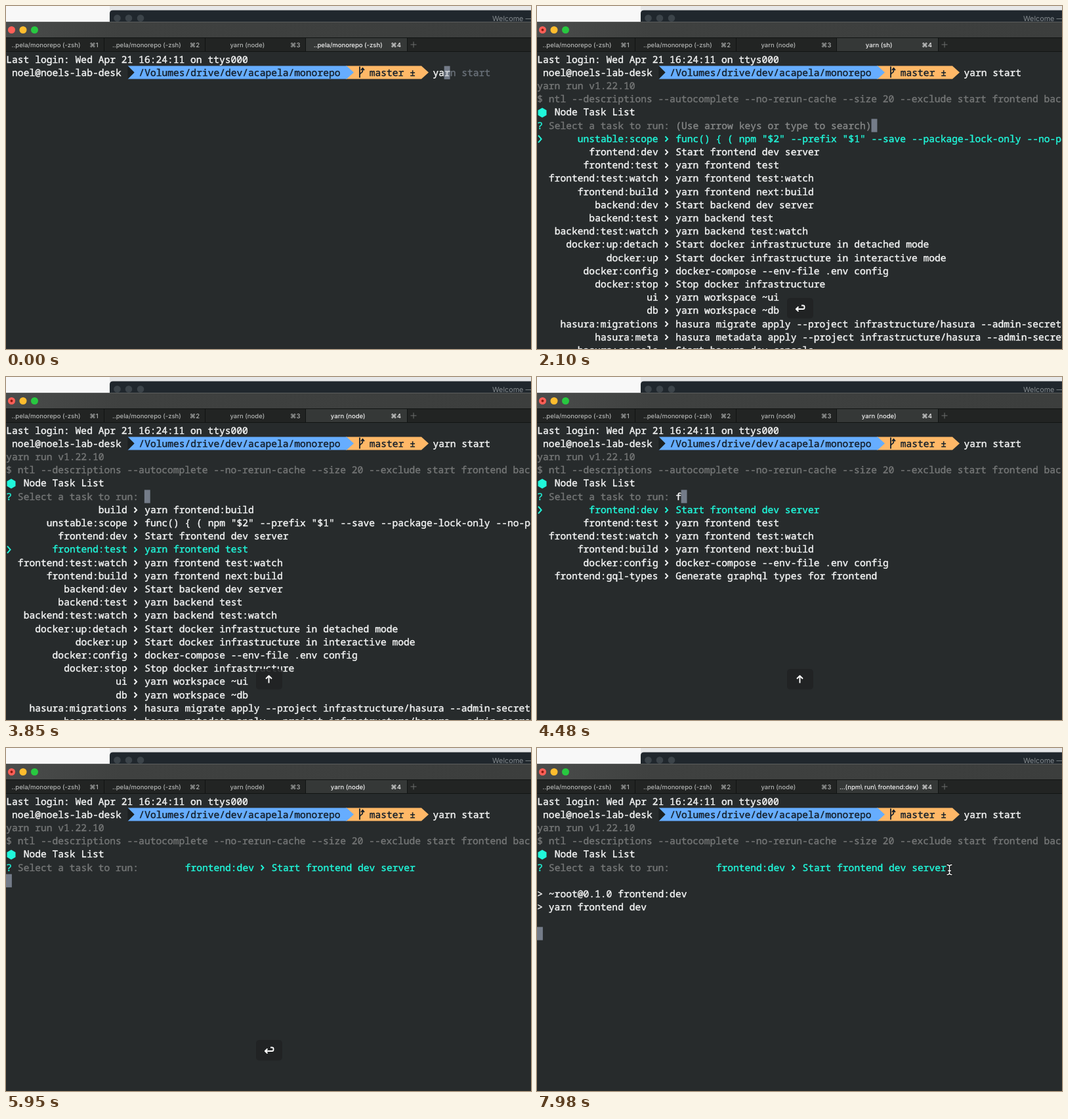
Recreate the animation shown at these times as an HTML page. Size 800x524 px, loop 8 s.

```html
<!DOCTYPE html>
<html lang="en">
<head>
<meta charset="utf-8">
<style>
html, body { margin: 0; width: 100%; height: 100%; overflow: hidden; background: #272b2c; }
svg { display: block; width: 800px; height: 524px; }
text { white-space: pre; text-rendering: geometricPrecision; }
.term text { font: 500 14.64px "Noto Sans Mono", monospace; font-variant-ligatures: none; stroke-width: .42px; }
.ui text { font: 500 9.5px Inter, sans-serif; text-anchor: middle; }
</style>
</head>
<body>
<svg viewBox="0 0 800 524">
  <defs>
    <linearGradient id="bar">
      <stop offset="0" stop-color="#4a4c4b"/><stop offset=".22" stop-color="#3f4140"/><stop offset="1" stop-color="#3c3e3d"/>
    </linearGradient>
  </defs>
  <rect width="800" height="30" fill="#f8f8f8"/>
  <rect x="158" width="642" height="10" fill="#e6e7e8"/>
  <path d="M158 30V11.500q0-5 5-5H800V30Z" fill="#20272d"/>
  <g fill="#3c444a"><circle cx="169.500" cy="18.500" r="5.300"/><circle cx="187" cy="18.500" r="5.300"/><circle cx="205" cy="18.500" r="5.300"/></g>
  <text x="741" y="22.500" font-family="Inter, sans-serif" font-size="10.800" fill="#878d91">Welcome —</text>
  <path d="M0 24H800V524H0Z" fill="#272b2c"/>
  <rect y="24" width="800" height="25" fill="url(#bar)"/>
  <path d="M0 24.500H800" stroke="#5c5e5d"/>
  <circle cx="8.500" cy="36.500" r="5.500" fill="#ff5f57"/>
  <circle cx="26" cy="36.500" r="5.500" fill="#febc2e"/>
  <circle cx="43.500" cy="36.500" r="5.500" fill="#28c840"/>
  <circle id="dirty" cx="8.500" cy="36.500" r="1.900" fill="#8c1a10"/>
  <rect y="49" width="800" height="20" fill="#222423"/>
  <rect x="457" y="49" width="154" height="20" fill="#353837"/>
  <path d="M0 48.500H800M0 69.500H800M149.500 49V69M303.500 49V69M456.500 49V69M611.500 49V69" stroke="#111413"/>
  <path d="M616.500 59H625.500M621 54.500V63.500" stroke="#6c6f6e"/>
  <g class="ui" id="tabs"></g>
  <g class="term" id="term" transform="translate(0 -.5)"></g>
  <g id="key"></g>
  <g id="mouse" fill="none" stroke-linecap="round">
    <path id="beam" d="M625 178.500Q628.500 178.500 628.500 181.500Q628.500 178.500 632 178.500M628.500 181V191M625 193.500Q628.500 193.500 628.500 190.500Q628.500 193.500 632 193.500M626.500 187.500H630.500" stroke="#101314" stroke-width="3.400"/>
  </g>
</svg>
<script>
const LOOP = 8000, CW = 8.785, LH = 20.19;
const WHITE = '#f4f5f5', GRAY = '#747676', CYAN = '#20f7da', CURSOR = '#747c89';
const T = { enter: 1400, yarn: 1610, script: 1680, list: 1890, node: 2300, pick: 5850, run: 7630, mouse: 7770 };
const keys = [
  [T.enter, 'enter'], [2560, 'down'], [2840, 'down'], [3120, 'down'],
  [3640, 'up'], [4000, 'up'], [T.pick + 70, 'enter']
];
const glyphs = {
  enter: 'M403 457.500H405.500Q407.500 457.500 407.500 459.500V461Q407.500 463 405.500 463H395M398.500 459.500L394.800 463L398.500 466.500',
  up: 'M400.500 467.500V457M396 461L400.500 456.500L405 461',
  down: 'M400.500 456.500V467M396 463L400.500 467.500L405 463'
};
const tasks = `unstable:scope|func() { ( npm "$2" --prefix "$1" --save --package-lock-only --no-package-lock
frontend:dev|Start frontend dev server
frontend:test|yarn frontend test
frontend:test:watch|yarn frontend test:watch
frontend:build|yarn frontend next:build
backend:dev|Start backend dev server
backend:test|yarn backend test
backend:test:watch|yarn backend test:watch
docker:up:detach|Start docker infrastructure in detached mode
docker:up|Start docker infrastructure in interactive mode
docker:config|docker-compose --env-file .env config
docker:stop|Stop docker infrastructure
ui|yarn workspace ~ui
db|yarn workspace ~db
hasura:migrations|hasura migrate apply --project infrastructure/hasura --admin-secret
hasura:meta|hasura metadata apply --project infrastructure/hasura --admin-secret
hasura:console|Start hasura dev console
frontend:gql-types|Generate graphql types for frontend
build|yarn frontend:build`.split('\n').map(line => line.split('|'));

const $ = id => document.getElementById(id);
const esc = s => s.replace(/&/g, '&amp;').replace(/</g, '&lt;');
const clamp = (v, lo, hi) => Math.max(lo, Math.min(hi, v));
const put = (col, row, s, fill = WHITE) =>
  `<text x="${(col * CW + 0.3).toFixed(2)}" y="${(87.2 + row * LH).toFixed(2)}" fill="${fill}" stroke="${fill}">${esc(s)}</text>`;
const block = (col, row) =>
  `<rect x="${col * CW}" y="${72 + row * LH}" width="8.900" height="20.2" fill="${CURSOR}"/>`;
const chevron = (x, row, w, h, color) => {
  const y = 82.5 + row * LH;
  return `<path d="M${x} ${y - h}L${x + w} ${y}L${x} ${y + h}" fill="none" stroke="${color}" stroke-width="2"/>`;
};
const entry = (end, row, [name, about], color) =>
  put(end - name.length, row, name, color) + chevron((end + 1) * CW + 2.2, row, 3.6, 3.9, color) + put(end + 3, row, about, color);

function prompt(typed) {
  const cmd = 'yarn start', ink = '#15202b';
  let out = put(0, 0, 'Last login: Wed Apr 21 16:24:11 on ttys000') + put(1, 1, 'noel@noels-lab-desk')
    + '<path d="M518 92H633L644 102L633 112H518Z" fill="#ffb867"/>'
    + '<path d="M185.500 92H519L530 102L519 112H185.500L195.500 102Z" fill="#66adff"/>'
    + '<path d="M185.500 92L195.500 102L185.500 112Z" fill="#1c2021"/>'
    + put(23, 1, '/Volumes/drive/dev/acapela/monorepo', ink) + put(63, 1, 'master ±', ink)
    + '<path d="M539 93V110M539 106Q539 103.500 541.500 102.500Q543.500 101.500 543.500 99V96M541 98.500L543.500 95.500L546 98.500" fill="none" stroke="#15202b" stroke-width="1.800"/>';
  if (typed !== null) out += block(74 + typed, 1);
  const n = typed === null ? cmd.length : typed;
  out += put(74, 1, cmd.slice(0, n));
  if (n < cmd.length) out += put(74 + n, 1, cmd[n], '#d5d8dc') + put(75 + n, 1, cmd.slice(n + 1), '#697078');
  return out;
}

function taskList(t) {
  const query = 'front'.slice(0, clamp(Math.floor((t - 4300) / 120), 0, 5));
  const pressed = k => keys.filter(([at, name]) => name === k && t >= at).length;
  const downs = pressed('down'), ups = pressed('up');
  const found = tasks.filter(([name]) => name.includes(query));
  // moving down advances the pointer, moving up scrolls the list under it
  const pointer = query ? 0 : downs, first = query ? 0 : -ups;
  const hint = !downs ? '(Use arrow keys or type to search)' : '';
  let out = block(24 + (hint || query).length, 5)
    + put(24, 5, hint, '#858787') + put(24, 5, query);
  for (let i = 0; i < Math.min(found.length, 17); i++) {
    const on = i === pointer, row = 6 + i;
    out += entry(21, row, found[(i + first + found.length) % found.length], on ? CYAN : WHITE);
    if (on) out += chevron(2, row, 4.6, 5.4, CYAN);
  }
  return out;
}

function terminal(t) {
  const typed = clamp(2 + Math.floor((t + 30) / 100), 2, 10);
  let out = prompt(t < T.enter ? typed : null);
  if (t < T.enter) return out;
  if (t < T.yarn) return out + block(0, 2);
  out += put(0, 2, 'yarn run v1.22.10', GRAY);
  if (t < T.script) return out + block(0, 3);
  out += put(0, 3, '$ ntl --descriptions --autocomplete --no-rerun-cache --size 20 --exclude start frontend backend', GRAY);
  if (t < T.list) return out + block(0, 4);
  out += `<path d="M8 156L14.500 159.700V167.300L8 171L1.500 167.300V159.700Z" fill="${CYAN}"/>`
    + put(3, 4, 'Node Task List') + put(0, 5, '?', CYAN) + put(2, 5, 'Select a task to run:', GRAY);
  if (t < T.pick) return out + taskList(t);
  out += entry(43, 5, tasks[1], CYAN);
  if (t < T.run) return out + block(0, 6);
  return out + put(0, 7, '> ~root@0.1.0 frontend:dev') + put(0, 8, '> yarn frontend dev') + block(0, 10);
}

function tabs(t) {
  const shell = '..pela/monorepo (-zsh)';
  const last = t < T.yarn ? shell : t < T.node ? 'yarn (sh)' : t < T.run ? 'yarn (node)' : '...(npm\\ run\\ frontend:dev)';
  return [shell, shell, 'yarn (node)', last].map((s, i) => {
    const x = 61 + i * 153.4, fill = i === 3 ? '#f4f4f4' : '#b4b6b5';
    return `<g fill="${fill}"><text x="${x}" y="62.500">${s}</text><text x="${x + 73}" y="62.500">⌘${i + 1}</text></g>`;
  }).join('');
}

function overlay(t) {
  const hit = keys.filter(([at]) => t >= at).pop();
  const alpha = hit ? clamp(1 - (t - hit[0] - 700) / 350, 0, 1) : 0;
  if (!alpha) return '';
  return `<g opacity="${alpha.toFixed(2)}"><rect x="381" y="446" width="40" height="31.500" rx="5" fill="#202324" fill-opacity=".88"/>`
    + `<path d="${glyphs[hit[1]]}" fill="none" stroke="#fff" stroke-width="1.900" stroke-linejoin="round"/></g>`;
}

const cache = {};
function set(id, html) {
  if (cache[id] !== html) $(id).innerHTML = cache[id] = html;
}

function draw(t) {
  set('term', terminal(t));
  set('tabs', tabs(t));
  set('key', overlay(t));
  $('dirty').style.display = t < T.yarn ? 'none' : '';
  $('mouse').style.display = t < T.mouse ? 'none' : '';
}

// white core over the dark outline of the pointer
const core = $('beam').cloneNode();
core.removeAttribute('id');
core.setAttribute('stroke', '#fff');
core.setAttribute('stroke-width', '1.3');
$('mouse').append(core);

const start = performance.now();
function tick() {
  draw((performance.now() - start) % LOOP);
  requestAnimationFrame(tick);
}
tick();
</script>
</body>
</html>
```
